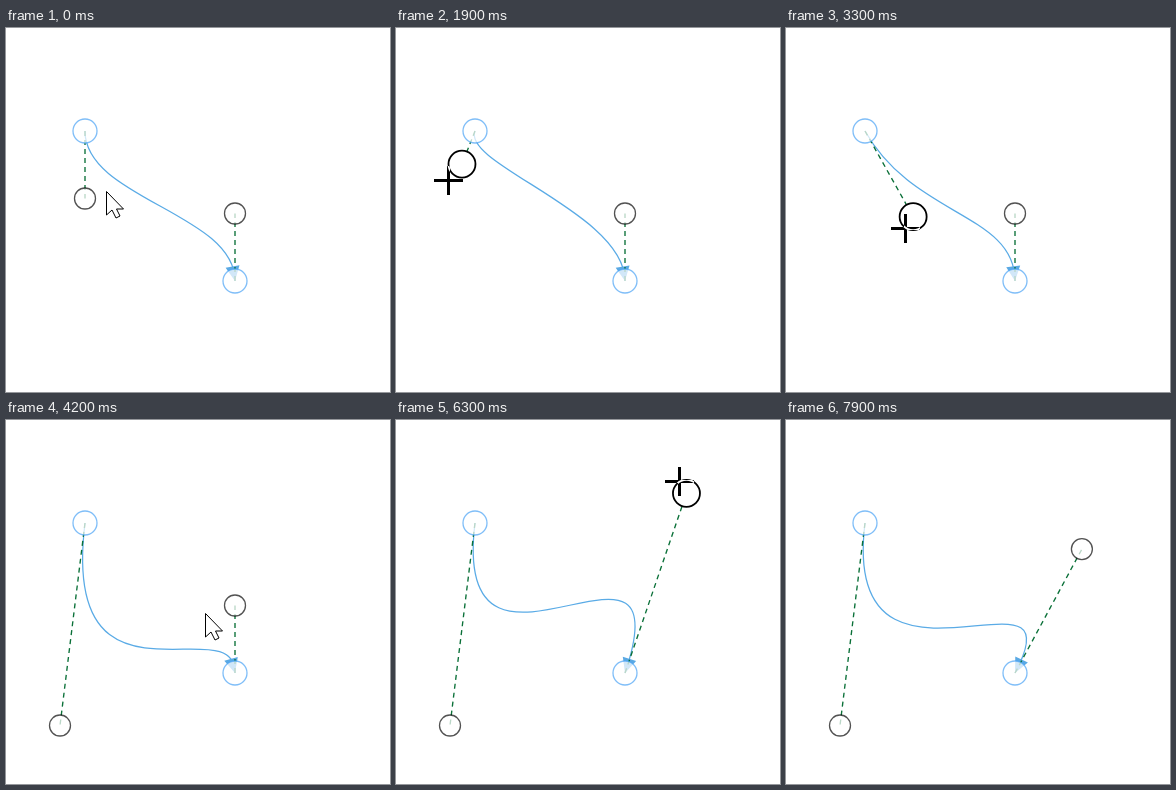
An HTML page for the animation above (8.5 s loop, 384 by 364 pixels).

```html
<!DOCTYPE html>
<html lang="en">
<head>
<meta charset="utf-8">
<title>Bezier handles</title>
<style>
  html, body { margin: 0; width: 100%; height: 100%; overflow: hidden; background: #fff; }
  svg { display: block; width: 384px; height: 364px; isolation: isolate; }
  .curve { fill: none; stroke: #5aabe6; stroke-width: 1.25; }
  .tip { fill: #5aa9e4; }
  .arm { stroke: #0a7038; stroke-width: 1.35; stroke-dasharray: 5 4; }
  .anchor, .handle { fill: #fff; fill-opacity: .72; stroke-width: 1.3; }
  .anchor { stroke: #4aa3f5; stroke-opacity: .7; }
  .handle { stroke: #000; stroke-opacity: .68; }
  .handle.active { fill-opacity: 1; stroke-width: 1.8; stroke-opacity: 1; }
  .arrow { fill: #fff; stroke: #000; stroke-width: 1; }
  .cross { fill: #fff; mix-blend-mode: difference; shape-rendering: crispEdges; }
</style>
</head>
<body>
<svg viewBox="0 0 384 364">
  <rect width="384" height="364" fill="#fff"/>
  <path id="curve" class="curve"/>
  <path id="tip" class="tip"/>
  <path id="arm1" class="arm"/>
  <path id="arm2" class="arm"/>
  <circle class="anchor" cx="79" cy="103" r="12"/>
  <circle class="anchor" cx="229" cy="253" r="12"/>
  <circle id="handle1" class="handle"/>
  <circle id="handle2" class="handle"/>
  <path id="arrow" class="arrow" d="M.5 .5V24L6 19L10 27L14 25L10.500 18H17.500Z"/>
  <path id="cross" class="cross" d="M-1.500-14.500h3v13h13v3h-13v13h-3v-13h-13v-3h13z"/>
</svg>
<script>
const LOOP = 8500, STEP = 100, LAG = .4;
const A = [79, 103], B = [229, 253];

// The pointer travels in arcs: each leg adds [steps, x, y, bend] to a stroke
const legs = [];
let place = [100, 163];

function stroke(start, ...arcs) {
  for (const [steps, x, y, bend = 0] of arcs) {
    legs.push({ start, end: start + steps, from: place, to: [x, y], bend });
    start += steps;
    place = [x, y];
  }
}

stroke(0, [5, 82.5, 171]);
stroke(8, [5, 63.5, 251.5, .16], [2, 72, 298], [2, 92, 113]);
stroke(18, [4, 45, 299, .2], [2, 87, 191], [1, 153.5, 147.5], [3, 251, 76], [8, 74, 302, .1], [2, 49, 306.4]);
stroke(38, [4, 199, 193]);
stroke(44, [1, 229, 185.5]);
stroke(45, [7, 218, 333]);
stroke(53, [2, 275.5, 300.5, .07], [7, 300, 97, .2], [4, 205, 75, .42], [4, 241.5, 66.5, .28], [3, 295, 139], [1, 296.5, 122.5]);
stroke(75, [4, 55, 400]);

const drags = [
  { id: 1, start: 8, end: 38, home: [79, 170.5] },
  { id: 2, start: 45, end: 75, home: [229, 185.5] }
];

const $ = id => document.getElementById(id);
const legAt = t => legs.findLast(leg => leg.start < t) || legs[0];

function pointer(t) {
  const { start, end, from, to, bend } = legAt(t);
  const s = Math.min((t - start) / (end - start), 1);
  const dx = to[0] - from[0], dy = to[1] - from[1], arc = 4 * bend * s * (1 - s);
  return [from[0] + dx * s - dy * arc, from[1] + dy * s + dx * arc];
}

// A dragged handle trails slightly behind the pointer
function handleAt({ start, end, home }, step) {
  if (step <= start) return home;
  const t = Math.min(step, end);
  return pointer(Math.min(t, legAt(t).end) - LAG);
}

function bezier(h1, h2, t) {
  const u = 1 - t;
  return [0, 1].map(i =>
    u ** 3 * A[i] + 3 * u * u * t * h1[i] + 3 * u * t * t * h2[i] + t ** 3 * B[i]);
}

function tipPath(h1, h2) {
  const size = 14.5, half = 7;
  let t = 1, dx = 0, dy = 0, len = 0;
  while (t > 0 && len < size) {
    const p = bezier(h1, h2, t -= .002);
    dx = p[0] - B[0];
    dy = p[1] - B[1];
    len = Math.hypot(dx, dy);
  }
  const nx = -dy / len * half, ny = dx / len * half;
  return `M${B}l${dx + nx} ${dy + ny}l${-2 * nx} ${-2 * ny}Z`;
}

function drawHandle(drag, anchor, [x, y], step) {
  const active = step > drag.start && step <= drag.end;
  const el = $("handle" + drag.id);
  el.setAttribute("cx", x);
  el.setAttribute("cy", y);
  el.setAttribute("r", active ? 13.5 : 10.5);
  el.classList.toggle("active", active);
  $("arm" + drag.id).setAttribute("d", `M${anchor}L${x} ${y}`);
}

function draw(time) {
  const step = Math.floor(time % LOOP / STEP);
  const [h1, h2] = drags.map(drag => handleAt(drag, step));
  $("curve").setAttribute("d", `M${A}C${h1} ${h2} ${B}`);
  $("tip").setAttribute("d", tipPath(h1, h2));
  drawHandle(drags[0], A, h1, step);
  drawHandle(drags[1], B, h2, step);

  const crossed = (step >= 5 && step <= 38) || (step >= 45 && step <= 75);
  const [x, y] = pointer(step);
  for (const id of ["arrow", "cross"]) {
    $(id).setAttribute("transform", `translate(${x} ${y})`);
    $(id).style.display = crossed === (id === "cross") ? "" : "none";
  }
}

const begin = performance.now();
function tick() {
  draw(performance.now() - begin);
  requestAnimationFrame(tick);
}
tick();
</script>
</body>
</html>
```
